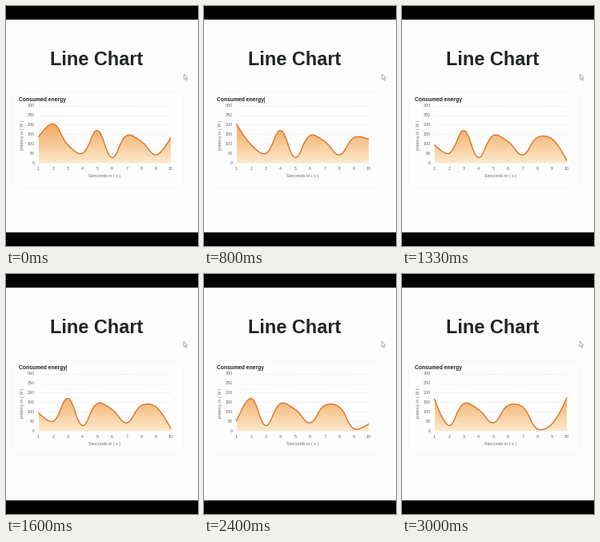
A matplotlib script for the animation above (3.07 s loop, 240x300 px).

```python
import matplotlib.pyplot as plt
import numpy as np
from matplotlib.animation import FuncAnimation
from matplotlib.patches import FancyBboxPatch, PathPatch, Polygon, Rectangle
from matplotlib.path import Path

W, H, DPI = 240, 300, 100
LOOP, STEP = 3070, 10
LEFT, RIGHT, TOP, BASE = 40.5, 206, 124.7, 196
READINGS = [135, 205, 95, 50, 170, 28, 143, 112, 42, 133, 125, 10, 37, 175]
WINDOW = 10
FIRST_SHIFT, SHIFT_EVERY = 200, 900
CARET_START, BLINK = 300, 530
ORANGE, INK, GREY = "#de742b", "#212523", "#6b6c72"

plt.rcParams["font.family"] = "Liberation Sans"
fig = plt.figure(figsize=(W / DPI, H / DPI), dpi=DPI, facecolor="black")
ax = fig.add_axes([0, 0, 1, 1])
ax.axis("off")


def px(size):
    return size * 72 / DPI


def y_of(value):
    return BASE - value * (BASE - TOP) / 300


def label(x, y, text, size=5.4, color=GREY, **kw):
    kw = {"ha": "center", "va": "baseline", **kw}
    return ax.text(x, y, text, fontsize=px(size), color=color, **kw)


def smooth_path(pts, tension=0.4):
    """Cardinal spline whose handles scale with the neighbouring spans."""
    verts = [pts[0], pts[0]]
    for prev, p, nxt in zip(pts, pts[1:], pts[2:]):
        before, after = np.hypot(*(p - prev)), np.hypot(*(nxt - p))
        pull = tension * (nxt - prev) / (before + after)
        verts += [p - pull * before, p, p + pull * after]
    verts += [pts[-1], pts[-1]]
    return Path(verts, [Path.MOVETO] + [Path.CURVE4] * (len(verts) - 1))


def area_path(line):
    verts = [*line.vertices, (RIGHT, BASE), (LEFT, BASE), (LEFT, BASE)]
    codes = [*line.codes, Path.LINETO, Path.LINETO, Path.CLOSEPOLY]
    return Path(verts, codes)


xs = np.linspace(LEFT, RIGHT, WINDOW)
curves = []
for start in range(len(READINGS) - WINDOW + 1):
    ys = y_of(np.array(READINGS[start:start + WINDOW]))
    line = smooth_path(np.column_stack([xs, ys]))
    curves.append((line, area_path(line)))

# Page, card and headings
ax.add_patch(Rectangle((0, 17), W, 266, color="#fdfdfd", lw=0))
ax.add_patch(FancyBboxPatch((18, 118), 194, 99, boxstyle="round,pad=10",
                            fc="#fdfdfd", ec="#f8f8f6", lw=px(1)))
label(113, 74.3, "Line Chart", 23.5, INK, weight="bold")
label(16, 119.2, "Consumed energy", 6.8, INK, weight="bold", ha="left")
caret, = ax.plot([75.5, 75.5], [114, 121], color="#444444", lw=px(0.8),
                 snap=False)

# Axes
for value in range(0, 301, 50):
    y = y_of(value)
    ax.plot([LEFT, RIGHT], [y, y], color="#e4e4e4", lw=px(0.7),
            dashes=(2.5, 2.5), zorder=1)
    label(35.7, y + 1.8, value, ha="right")
for i, x in enumerate(xs):
    label(x, 205.2, i + 1)
label(123.3, 214, "Senconds in ( s )", 5.2)
label(20.9, 161, "potency in ( W )", 5.3, rotation=90, va="center")

# Series
mix = np.linspace(0, 1, 72)[:, None, None]
shades = np.array([234, 130, 30]) * (1 - mix) + np.array([253, 232, 200]) * mix
fill = ax.imshow(shades / 255, extent=(LEFT, RIGHT, BASE, TOP), aspect="auto",
                 interpolation="bilinear", alpha=0.95, zorder=2)
stroke = ax.add_patch(PathPatch(curves[0][0], fc="none", ec=ORANGE,
                                lw=px(1.4), zorder=3))

# Mouse pointer
ARROW = np.array([(0, 0), (0, 7), (1.6, 5.6), (2.7, 8), (3.7, 7.5),
                  (2.7, 5.2), (4.8, 5.2)])
pointer = ax.add_patch(Polygon(ARROW, fc="white", ec="#999999",
                               lw=px(0.7), zorder=5))

ax.set_xlim(0, W)
ax.set_ylim(H, 0)


def update(frame):
    t = frame * STEP
    shift = max(0, (t - FIRST_SHIFT) // SHIFT_EVERY + 1)
    line, area = curves[min(shift, len(curves) - 1)]
    stroke.set_path(line)
    fill.set_clip_path(area, ax.transData)
    caret.set_visible((t - CARET_START) // BLINK % 2 == 0)
    pointer.set_xy(ARROW + ((222.6, 85) if t < 1600 else (222, 84)))
    return fill, stroke, caret, pointer


anim = FuncAnimation(fig, update, frames=LOOP // STEP, interval=STEP,
                     repeat=True, repeat_delay=0)
plt.show()
```
